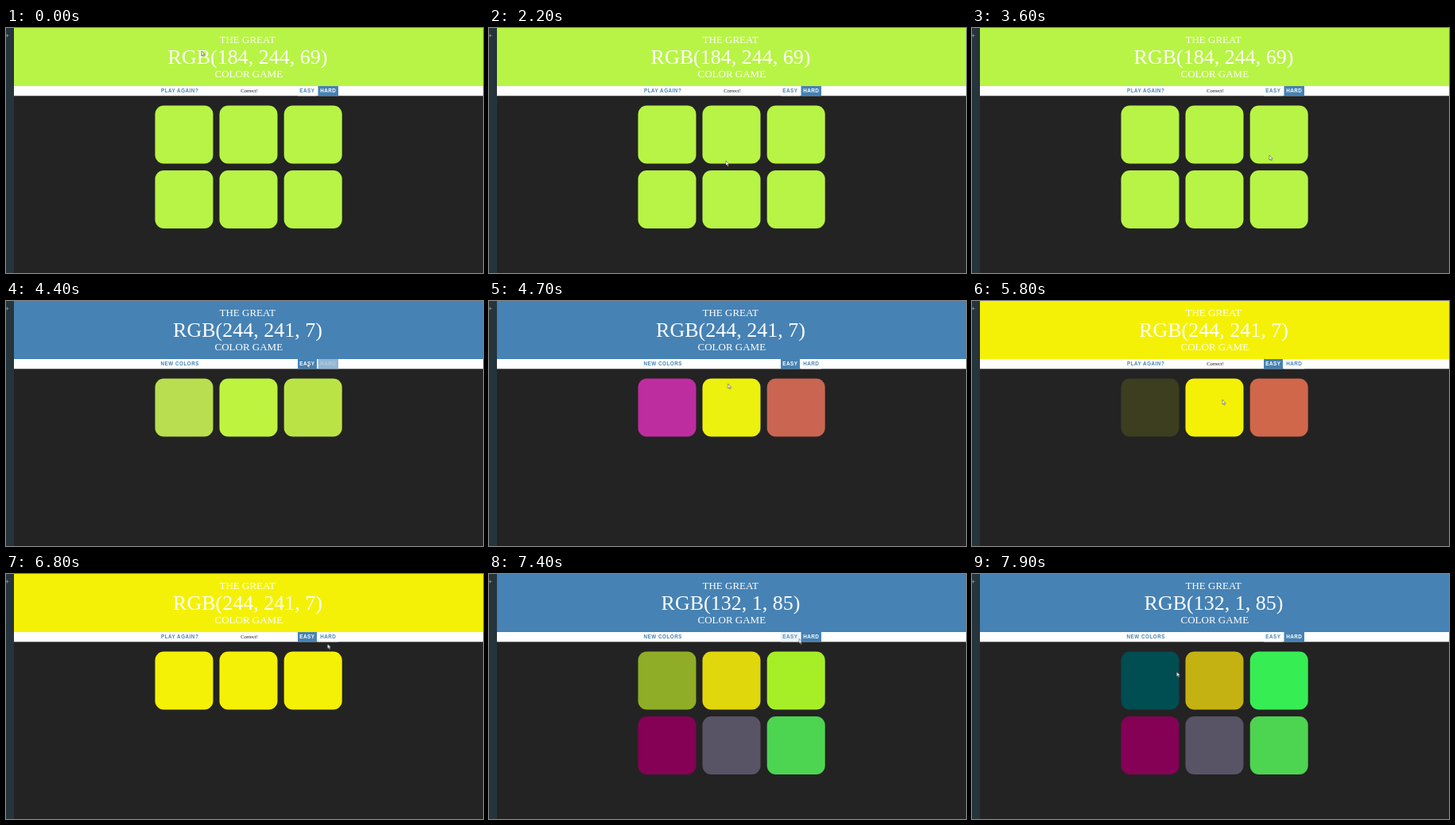
An HTML page for the animation above (8 s loop, 600 by 308 pixels).

```html
<!DOCTYPE html>
<html lang="en">
<head>
<meta charset="utf-8">
<title>Color Game</title>
<style>
  :root { --blue: #4682b4; --lime: #b8f445; --yellow: #f4f107; --dark: #232323; }
  html, body { margin: 0; width: 100%; height: 100%; overflow: hidden; background: var(--dark); }
  svg { display: block; width: 600px; height: 308px; }

  .anim, .cut { animation: 8s ease infinite; }
  .cut { animation-timing-function: step-end; }

  .title { font: 13px "Liberation Serif", Times, serif; fill: #fff; text-anchor: middle; }
  .goal { font-size: 26px; }
  .msg { font: 6.5px "Liberation Serif", Times, serif; fill: #111; text-anchor: middle; }
  .btn { font: bold 6.3px "Liberation Sans", Arial, sans-serif; letter-spacing: .5px; fill: var(--blue); }

  /* Rounds: easy picked 54.25%, wrong guess 64.375%, right guess 71.625%, hard picked 90.625% */
  .header { animation-name: header; }
  @keyframes header {
    0% { fill: var(--lime); }
    54.25% { fill: var(--blue); }
    71.625% { fill: var(--yellow); }
    90.625%, 100% { fill: var(--blue); }
  }

  .first { animation-name: first; }
  @keyframes first { 0% { opacity: 1; } 54.25%, 100% { opacity: 0; } }
  .second { animation-name: second; }
  @keyframes second { 0% { opacity: 0; } 54.25% { opacity: 1; } 90.625%, 100% { opacity: 0; } }
  .third { animation-name: third; }
  @keyframes third { 0% { opacity: 0; } 90.625%, 100% { opacity: 1; } }
  .won { animation-name: won; }
  @keyframes won {
    0%, 71.625% { opacity: 1; }
    54.25%, 90.625%, 100% { opacity: 0; }
  }
  .playing { animation-name: playing; }
  @keyframes playing {
    0%, 71.625% { opacity: 0; }
    54.25%, 90.625%, 100% { opacity: 1; }
  }
  .wrong { animation-name: wrong; }
  @keyframes wrong { 0%, 71.625%, 100% { opacity: 0; } 64.375% { opacity: 1; } }

  .left { animation-name: left; }
  @keyframes left {
    0%, 54.25% { fill: var(--lime); }
    61.75%, 64.375% { fill: rgb(190, 20, 170); }
    71.625% { fill: var(--dark); }
    79.125%, 90.625% { fill: var(--yellow); }
    98.125%, 100% { fill: rgb(0, 77, 82); }
  }
  .middle { animation-name: middle; }
  @keyframes middle {
    0%, 54.25% { fill: var(--lime); }
    61.75%, 90.625% { fill: var(--yellow); }
    98.125%, 100% { fill: rgb(196, 178, 18); }
  }
  .right { animation-name: right; }
  @keyframes right {
    0%, 54.25% { fill: var(--lime); }
    61.75%, 71.625% { fill: rgb(203, 83, 83); }
    79.125%, 90.625% { fill: var(--yellow); }
    98.125%, 100% { fill: rgb(55, 237, 84); }
  }

  .easy { animation-name: easy-box; }
  @keyframes easy-box {
    0%, 50.5% { fill: #fff; }
    53.5%, 90.625% { fill: var(--blue); }
    93.625%, 100% { fill: #fff; }
  }
  .easy-label { animation-name: easy-label; }
  @keyframes easy-label {
    0%, 50.5% { fill: var(--blue); }
    53.5%, 90.625% { fill: #fff; }
    93.625%, 100% { fill: var(--blue); }
  }
  .hard { animation-name: hard-box; }
  @keyframes hard-box {
    0%, 54.25% { fill: var(--blue); }
    57.25%, 87% { fill: #fff; }
    90%, 100% { fill: var(--blue); }
  }
  .hard-label { animation-name: hard-label; }
  @keyframes hard-label {
    0%, 54.25% { fill: #fff; }
    57.25%, 87% { fill: var(--blue); }
    90%, 100% { fill: #fff; }
  }

  .cursor { animation-name: roam; animation-timing-function: ease-in-out; }
  @keyframes roam {
    0% { transform: translate(246px, 29px); }
    6% { transform: translate(300px, 110px); }
    11% { transform: translate(374px, 236px); }
    16% { transform: translate(440px, 150px); }
    19% { transform: translate(400px, 34px); }
    23% { transform: translate(468px, 120px); }
    27.5% { transform: translate(298px, 167px); }
    31% { transform: translate(242px, 110px); }
    34.5% { transform: translate(258px, 42px); }
    40% { transform: translate(300px, 236px); }
    45% { transform: translate(374px, 160px); }
    51%, 55% { transform: translate(379px, 78px); }
    62%, 64.375% { transform: translate(240px, 124px); }
    66.25%, 68% { transform: translate(297px, 124px); }
    71%, 73% { transform: translate(315px, 124px); }
    79% { transform: translate(360px, 120px); }
    85% { transform: translate(404.5px, 88px); }
    88%, 91% { transform: translate(404px, 77px); }
    98%, 100% { transform: translate(257.5px, 123px); }
  }
</style>
</head>
<body>
<svg viewBox="0 0 600 308">
  <rect width="600" height="308" fill="#232323"/>
  <rect width="10" height="308" fill="#26343b"/>
  <path d="M-.5 9.5h4M1.5 7.5v4" stroke="#8a979d" stroke-width=".8"/>

  <rect class="cut header" x="10" width="590" height="73"/>
  <g class="title">
    <text x="303.7" y="19">THE GREAT</text>
    <g class="goal">
      <text class="cut first" x="304" y="45">RGB(184, 244, 69)</text>
      <text class="cut second" x="304" y="45">RGB(244, 241, 7)</text>
      <text class="cut third" x="304" y="45">RGB(132, 1, 85)</text>
    </g>
    <text x="305.3" y="62">COLOR GAME</text>
  </g>

  <rect x="10" y="73" width="590" height="12.3" fill="#fff"/>
  <rect class="anim easy" x="367" y="73" width="24" height="12.3"/>
  <rect class="anim hard" x="392.5" y="73" width="25.5" height="12.3"/>
  <g class="btn">
    <text class="cut won" x="195" y="81.2">PLAY AGAIN?</text>
    <text class="cut playing" x="194.5" y="81.2">NEW COLORS</text>
    <text class="anim easy-label" x="369.2" y="81.2">EASY</text>
    <text class="anim hard-label" x="395.2" y="81.2">HARD</text>
  </g>
  <g class="msg">
    <text class="cut won" x="306" y="81.2">Correct!</text>
    <text class="cut wrong" x="306.7" y="81.2">Try Again</text>
  </g>

  <defs><rect id="tile" y="97.5" width="73" height="73" rx="11"/></defs>
  <use class="anim left" href="#tile" x="187.5"/>
  <use class="anim middle" href="#tile" x="268.5"/>
  <use class="anim right" href="#tile" x="349.7"/>
  <g class="cut first" fill="#b8f445">
    <use href="#tile" x="187.5" y="81.5"/>
    <use href="#tile" x="268.5" y="81.5"/>
    <use href="#tile" x="349.7" y="81.5"/>
  </g>
  <g class="cut third">
    <use href="#tile" x="187.5" y="81.5" fill="rgb(132, 1, 85)"/>
    <use href="#tile" x="268.5" y="81.5" fill="rgb(88, 84, 102)"/>
    <use href="#tile" x="349.7" y="81.5" fill="rgb(77, 212, 80)"/>
  </g>

  <path class="anim cursor" d="M0 0V5.8L1.3 4.7L2.3 6.9L3.3 6.4L2.4 4.3H4.1Z"
        fill="#fff" stroke="#333" stroke-width=".5"/>
</svg>
</body>
</html>
```
